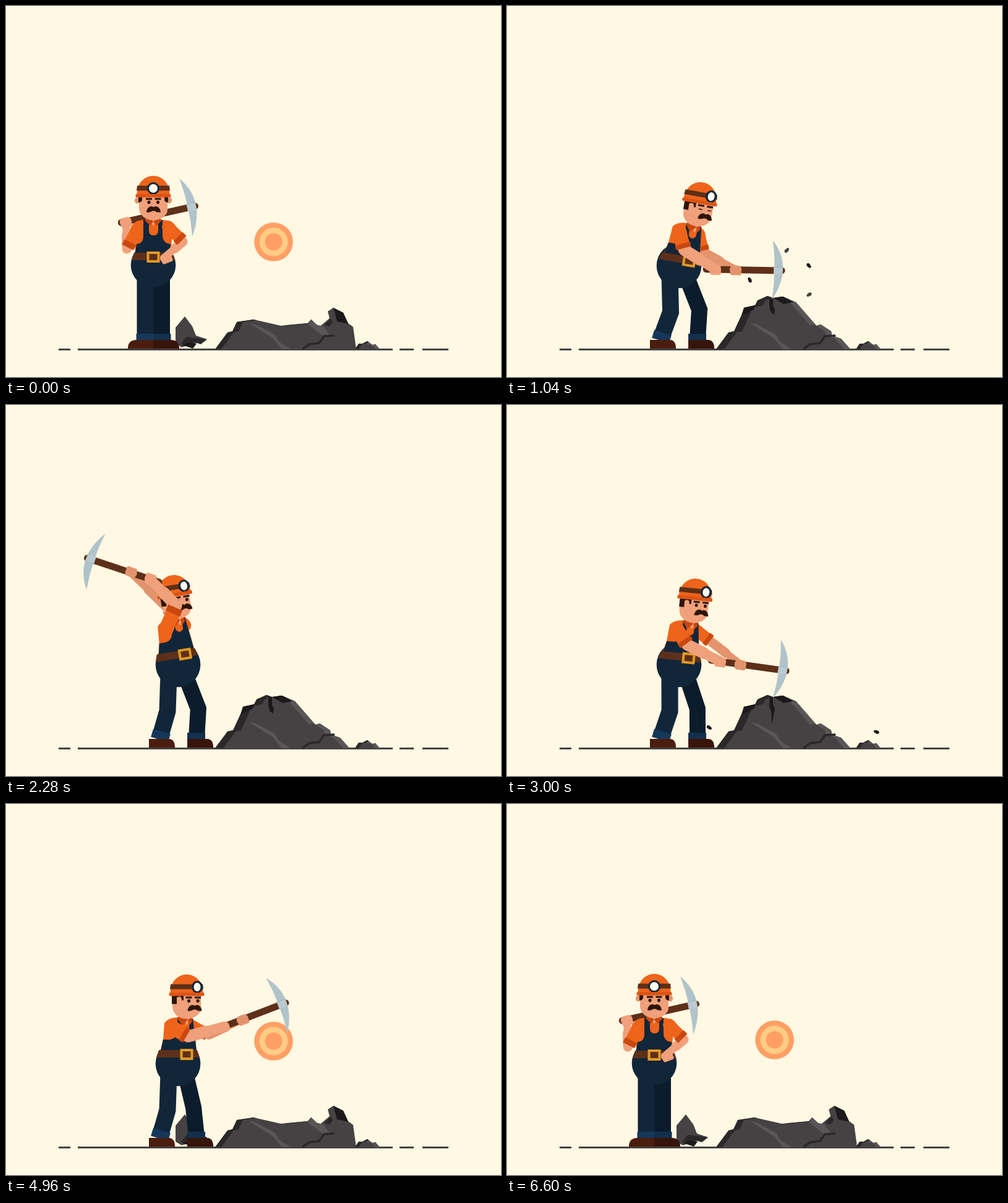
An HTML page with a canvas that plays this animation: 800 px wide and 600 px high, repeating every 7280 ms.

```html
<!DOCTYPE html>
<html>
<head>
<meta charset="utf-8">
<style>
html, body { margin: 0; width: 100%; height: 100%; overflow: hidden; background: #fff8e3; }
canvas { display: block; }
</style>
</head>
<body>
<canvas id="stage" width="800" height="600"></canvas>
<script>
const c = document.getElementById('stage').getContext('2d');
const LOOP = 7280, PERIOD = 1520, START = 40, BACK_AT = 760, HIT_AT = 880;
const BURST = 4000, TWIRL = 4980, TURN = 5480;
const NAVY = '#12263a', DARK = '#0c1c2c', CUFF = '#15375a', ORANGE = '#ee641b', RUST = '#c9480f',
  SKIN = '#f0a07a', SHADE = '#e3946d', BROWN = '#5e3019', HAIR = '#2e150a', STEEL = '#b1c3ca',
  ROCK = '#464243', ROCK_LIGHT = '#5a5657', ROCK_DARK = '#2b2829', BLACK = '#1b191a', GOLD = '#e39a24';

// Key poses: body tilt, grip x, grip y, pick angle
const REST = [6, 345, 415, 8], BACK = [-10, 232, 282, -163], HIT = [20, 348, 409, 10],
  SETTLE = [10, 337, 426, 1], READY = [0, 352, 360, -21], SHOULDER = [0, 201, 347, 347.4];

const clamp = v => Math.max(0, Math.min(1, v));
const rad = d => d * Math.PI / 180;
const ease = v => (v = clamp(v), v * v * (3 - 2 * v));
const mix = (a, b, u) => a.map((v, i) => v + (b[i] - v) * u);

// The grip moves over the shoulder in an arc
function overhead(a, b, u) {
  const pose = mix(a, b, u);
  pose[2] -= 55 * Math.sin(Math.PI * clamp(u));
  return pose;
}
function swingPose(p, end) {
  if (p < BACK_AT) {
    const u = clamp((p - START) / (BACK_AT - START));
    return overhead(REST, BACK, ease(u * 1.25) + .06 * Math.sin(Math.PI * clamp(u * 2 - 1)));
  }
  if (p < HIT_AT) return overhead(BACK, HIT, (p - BACK_AT) / (HIT_AT - BACK_AT));
  if (p < 920) return HIT;
  if (p < 1040) return mix(HIT, SETTLE, ease((p - 920) / 120));
  return mix(SETTLE, end, ease((p - 1040) / 440));
}
function twirlPose(u) {
  const pose = mix(READY, SHOULDER, ease(u * 2)), reach = 60 * Math.sin(Math.PI * u);
  pose[3] = READY[3] + (SHOULDER[3] - READY[3]) * u;
  pose[1] += reach * Math.cos(rad(pose[3] - 45));
  pose[2] += reach * Math.sin(rad(pose[3] - 45));
  return pose;
}

function path(d, color) {
  c.fillStyle = color;
  c.fill(new Path2D(d));
}
const poly = (points, color) => path(`M${points}Z`, color);
function oval(x, y, rx, ry, color) {
  c.fillStyle = color;
  c.beginPath();
  c.ellipse(x, y, rx, ry, 0, 0, 7);
  c.fill();
}
function box(x, y, w, h, color, r = 0) {
  c.fillStyle = color;
  c.beginPath();
  c.roundRect(x, y, w, h, r);
  c.fill();
}
function line(points, width, color, cap = 'butt') {
  c.strokeStyle = color;
  c.lineWidth = width;
  c.lineCap = cap;
  c.stroke(new Path2D('M' + points));
}
function at(x, y, angle, draw) {
  c.save();
  c.translate(x, y);
  c.rotate(angle);
  draw();
  c.restore();
}

// A rock is its outline plus strips left by sliding that outline sideways
function rock(points, dark, light) {
  const outline = new Path2D(`M${points}Z`);
  const strip = (dx, color) => {
    const rest = new Path2D('M0 0H800V600H0Z');
    rest.addPath(outline, new DOMMatrix([1, 0, 0, 1, dx, 0]));
    c.fillStyle = color;
    c.fill(rest, 'evenodd');
  };
  c.fillStyle = ROCK;
  c.fill(outline);
  c.save();
  c.clip(outline);
  if (light) strip(-light, ROCK_LIGHT);
  if (dark) strip(dark, ROCK_DARK);
  c.restore();
}
function ridges() {
  c.lineJoin = 'miter';
  poly('393 513 404 515 435 532 441 543 460 555 446 555 431 537', ROCK_LIGHT);
  line('479 555L490 547 506 545 514 534 531 533', 3.5, ROCK_DARK);
}

function wholePile(cracks) {
  rock('338 555 358 528 367 526 379 500 383 488 401 484 405 476 421 469 430 472 446 470 467 479 500 517 507 515 524 526 525 533 540 538 555 555', 13, 10);
  poly('383 488 401 484 399 491 381 500', BLACK);
  poly('430 472 446 470 463 479 447 482', BLACK);
  ridges();
  if (cracks) poly(`424 473 430 472 430 485 433 491 ${cracks > 1 ? '428 517' : '432 499'} 427 496 424 487`, BLACK);
}

function brokenPile(e) {
  const u = clamp(e / 420), lift = -260 * u * (1 - u);
  at(90 * (u - 1), lift, .5 * (u - 1), () => {
    rock('505 520 523 505 520 494 529 488 545 496 553 513 561 519 566 555 510 555');
    poly('529 488 545 496 553 514 535 510', BLACK);
  });
  rock('338 555 358 528 366 526 373 511 400 507 444 517 488 513 493 507 503 516 513 518 524 505 545 535 553 555', 10);
  poly('488 515 493 507 503 516 513 518 524 534 513 534', ROCK_LIGHT);
  ridges();
  at(298 + 120 * (1 - u), 530 + lift, 3 * (1 - u), () => {
    poly('-9 -28 3 -12 9 3 27 9 10 15 -14 22 -24 16 -24 -10', ROCK);
    poly('-6 5 27 9 17 17 7 14 -16 17', ROCK_DARK);
    poly('-14 18 -2 14 10 16 4 24', BLACK);
  });
}

function coin(t) {
  const u = clamp((t - BURST) / 600) - 1;
  const rise = t < START ? 1 : 1 + 2.2 * u ** 3 + 1.2 * u ** 2;
  const bob = t < START || t > 6600 ? 0 : 2 * Math.cos((t - 4960) / 1640 * 1.5 * Math.PI);
  const y = 381.5 + bob + 140 * (1 - rise);
  oval(432.5, y, 31.3, 31.3, '#ff9f64');
  oval(432.5, y, 23, 23, '#ffcc85');
  oval(432.5, y, 14, 14, '#ff9f64');
}

function debris(e, gold) {
  // drift, launch speed, gravity
  [[118, -.725, .0016], [293, -.461, .00093], [293, -.168, .00093], [-175, -.261, .000577]].forEach(([drift, speed, g], i) => {
    const x = 428 + drift * (1 - Math.exp(-e / 700)), y = 470 + speed * e + g * e * e;
    if (e > 60 && y < 552) at(x, y, i * 1.7 - 1 + (e - 160) * .006, () =>
      poly('-5 -1 -2 -3 4 -1 4 2 0 3 -4 2', i % 2 ? BLACK : ROCK));
  });
  if (e > 100) return;
  const reach = 8 + e * .28;
  for (let i = 0; i < 6; i++) at(429, 474, -2.2 + i * .35, () =>
    line(`${reach * .4} 0H${reach}`, 4, gold && i % 2 ? '#ffb52e' : ROCK, 'round'));
}

function pick(x, y, angle, smear) {
  at(x, y, rad(angle), () => {
    line('-15 0H107', 11, BROWN, 'round');
    c.translate(112, 0);
    const top = smear ? -70 : -49, back = smear ? -27 : -20;
    if (smear) {
      poly('-72 -5 -42 -9 -39 -20 -31 -12 -27 -25 -20 -16 -18 -33 -12 0 -72 4', BROWN);
      path('M-30 -53Q-7 -22 -14 0Q-22 -12 -30 -53', '#a4b7bf');
    }
    path(`M${back} ${top}Q14 ${top * .1} -20 47Q-13 0 ${back} ${top}`, STEEL);
    box(-18, -6.5, 14, 13, '#b9cad0', 1);
    line('-18 -6H-4', 1, '#9fb3bb');
  });
}

// Head around the middle of the helmet's lower edge; a side view shifts the features
function head(side, shut) {
  const eyes = side ? 11 : .5, mouth = side ? 13 : .5, lamp = side ? 17 : 0;
  if (!side) [-26, 26].forEach(x => oval(x, 10, 4, 5, SHADE));
  path('M-23 4H23V25C23 34 12 42 0 42C-12 42 -23 34 -23 22Z', SKIN);
  if (side) {
    path('M-24 4H-5V12H-9V7H-16V18H-24Z', HAIR);
    oval(-12, 11, 4, 5, SKIN);
  } else {
    path('M-24 4H-18V10L-21 13H-24ZM24 4H18V10L21 13H24Z', HAIR);
  }
  [-7.5, 7].forEach(x => {
    box(eyes + x - 5, 6, 10, 3, HAIR);
    if (shut) box(eyes + x - 3, 13, 6, 1.4, HAIR);
    else oval(eyes + x, 13, 2.5, 2.7, HAIR);
  });
  at(mouth, 0, 0, () => path('M-11.5 29C-11 21 -4 17 0 21C4 17 11 21 11.5 29Q5 30 2 27H-2Q-6 30 -11.5 29Z', HAIR));
  path('M-26.5 1C-26.5 -40 26.5 -40 26.5 1Z', ORANGE);
  path('M-26 -14H26L27 -6H-27Z', BROWN);
  oval(lamp, -9.5, side ? 9 : 10, 10, NAVY);
  oval(lamp, -9.5, side ? 5.5 : 7, 7, '#fffcef');
  box(-28.5, -.5, 57, 5.5, '#dc5414', 2);
}

const belt = (x, y) => at(x, y, 0, () => poly('-31 -7 31 -7 35 5 -35 5', BROWN));
function buckle(x, y) {
  box(x - 10.5, y - 9, 21, 18, GOLD);
  box(x - 6.5, y - 5, 13, 10, BROWN);
}

function elbow(s, h, upper, lower, bend) {
  const dx = h.x - s.x, dy = h.y - s.y, d = Math.hypot(dx, dy) || 1;
  const along = Math.min(upper, (d * d + upper * upper - lower * lower) / (2 * d));
  const off = bend * Math.sqrt(Math.max(0, upper * upper - along * along));
  return { x: s.x + (dx * along - dy * off) / d, y: s.y + (dy * along + dx * off) / d };
}
function arm(s, h, e, skin, width) {
  const p = k => `${s.x + (e.x - s.x) * k} ${s.y + (e.y - s.y) * k}`;
  c.lineJoin = 'round';
  line(`${p(.6)}L${e.x} ${e.y}L${h.x} ${h.y}`, width - 8, skin, 'round');
  line(`${p(.5)}L${e.x} ${e.y}L${(e.x + h.x) / 2} ${(e.y + h.y) / 2}`, width - 5, skin, 'round');
  line(`${p(0)}L${p(.12)}`, width, ORANGE, 'round');
  line(`${p(0)}L${p(.75)}`, width - 1, ORANGE);
  line(`${p(.67)}L${p(.92)}`, width + 1, RUST);
}
// A raised arm shows its full upper length
function sideArm(s, h, skin, width) {
  const upper = 30 + 14 * clamp((s.y - h.y) / 90);
  arm(s, h, elbow(s, h, upper, 60, 1), skin, width);
}
function hand(x, y, angle, skin) {
  at(x, y, rad(angle), () => {
    box(-10, -7, 19, 14, skin, 6);
    [-5, 0, 5].forEach(dx => oval(dx, 5, 4, 4, skin));
  });
}

const boot = (x, color) =>
  path(`M${x} 540H${x + 33}Q${x + 42} 541 ${x + 42} 554H${x}Z`, color);

function sideMiner([tilt, hx, hy, angle], grip, shut, smear) {
  const a = rad(tilt), bow = Math.max(0, tilt), drop = bow / 2;
  const turn = (x, y) => ({
    x: 278 + (x - 278) * Math.cos(a) - (y - 420) * Math.sin(a),
    y: 420 + drop + (x - 278) * Math.sin(a) + (y - 420) * Math.cos(a)
  });
  c.lineJoin = 'miter';
  line(`291 440L${303 + .8 * Math.abs(tilt)} 491L308 538`, 26, DARK);
  line('307.5 530V541', 29, '#12304d');
  boot(293, '#38140a');
  line(`263 435L${261 + .35 * bow} 495L249 537`, 27, NAVY);
  line('252 528L248 541', 29, CUFF);
  boot(231, '#4b1d0e');

  const far = {
    x: 305 + (hx + 33 * Math.cos(rad(angle)) - 305) * grip,
    y: 402 + (hy + 33 * Math.sin(rad(angle)) - 402) * grip
  };
  sideArm(turn(300, 359), far, SHADE, 20);
  oval(278, 420, 36.3, 36.3, NAVY);
  at(278, 420 + drop, a, () => {
    c.translate(-278, -420);
    path('M256 354Q262 346 276 345L301 346Q306 370 308 401H249L254 380Z', ORANGE);
    path('M249 403L254 381H265Q277 379 277 364V346L283 345 284 364Q290 372 296 364V347L302 347 308 400Z', NAVY);
    poly('285 341 300 344 292 358', SKIN);
    poly('276 346 284 340 294 349 285 358', RUST);
    poly('294 349 300 344 301 352 296 358', RUST);
    belt(278, 405);
    buckle(292, 405);
    at(292, 305.5, 0, () => head(true, shut));
  });

  pick(hx, hy, angle, smear);
  if (grip > .5) hand(far.x, far.y, angle, SHADE);
  sideArm(turn(268, 361), { x: hx, y: hy }, SKIN, 24);
  hand(hx, hy, angle, SKIN);
}

function frontMiner([, hx, hy, angle], shift) {
  pick(hx, hy, angle);
  c.save();
  c.translate(shift, 0);
  box(211.5, 435, 27, 97, NAVY);
  box(238, 435, 27, 97, DARK);
  box(210.5, 530, 28, 11, CUFF);
  box(238, 530, 28.5, 11, '#12304d');
  path('M197 554Q197 540 211 540H238.5V554Z', '#4b1d0e');
  path('M280 554Q280 540 266 540H238V554Z', '#38140a');
  oval(238, 419, 36.3, 36, NAVY);
  path('M204 356Q208 346 222 346H254Q266 346 270 356L266 402H210Z', ORANGE);
  path('M208 402L211 385Q222 384 222 372V346H231V363Q231 371 238.5 371Q246 371 246 363V346H253V372Q254 384 266 385L268 402Z', NAVY);
  poly('230 341 246 341 238 356', SKIN);
  poly('224 346 231 340 238 349 232 355', RUST);
  poly('252 346 245 340 238 349 244 355', RUST);
  belt(238, 406);
  arm({ x: 262, y: 357 }, { x: 259, y: 404 }, { x: 286, y: 381 }, SKIN, 20);
  buckle(238, 406);
  hand(259, 407, -20, SKIN);
  at(238, 304.5, 0, () => head(false));
  c.restore();
  const s = { x: 212 + shift, y: 360 }, wrist = { x: hx - 7, y: hy + 2 };
  arm(s, wrist, elbow(s, wrist, 37, 44, -1), SKIN, 20);
  box(222 + shift, 352, 9, 36, NAVY);
  hand(wrist.x, wrist.y, angle, SKIN);
}

function draw(t) {
  const swing = Math.min(2, Math.floor((t - START) / PERIOD)), p = t - swing * PERIOD;
  const hits = t < START ? 0 : swing + (p >= HIT_AT);
  const e = hits ? t - HIT_AT - (hits - 1) * PERIOD : 1e4;
  const twirl = t < START ? 1 : 1 - (1 - clamp((t - TWIRL) / 950)) ** 2;
  const pose = twirl ? twirlPose(twirl) : swingPose(p, swing < 2 ? REST : READY);

  c.fillStyle = '#fff8e3';
  c.fillRect(0, 0, 800, 600);
  c.save();
  c.translate(0, 3 * Math.exp(-e / 30));
  line('85 555.5H104M116 555.5H625M636 555.5H659M673 555.5H715', 3, ROCK);
  if (t < START || t >= BURST) {
    coin(t);
    brokenPile(t < START ? 1e4 : t - BURST);
  } else wholePile(hits);
  rock('564 555 570 546 576 546 584 542 592 548 597 547 604 555', 6, 7);

  if (t < START || t >= TURN) {
    const u = t < START ? 0 : 1 - clamp((t - TURN) / 320);
    frontMiner(pose, 40 * u ** 3);
  } else sideMiner(pose, 1 - clamp(twirl * 4), p >= 800 && p < 1240, p >= 820 && p < 960);
  debris(e, hits === 3);
  c.restore();
}

const start = performance.now();
function tick() {
  draw((performance.now() - start) % LOOP);
  requestAnimationFrame(tick);
}
tick();
</script>
</body>
</html>
```
